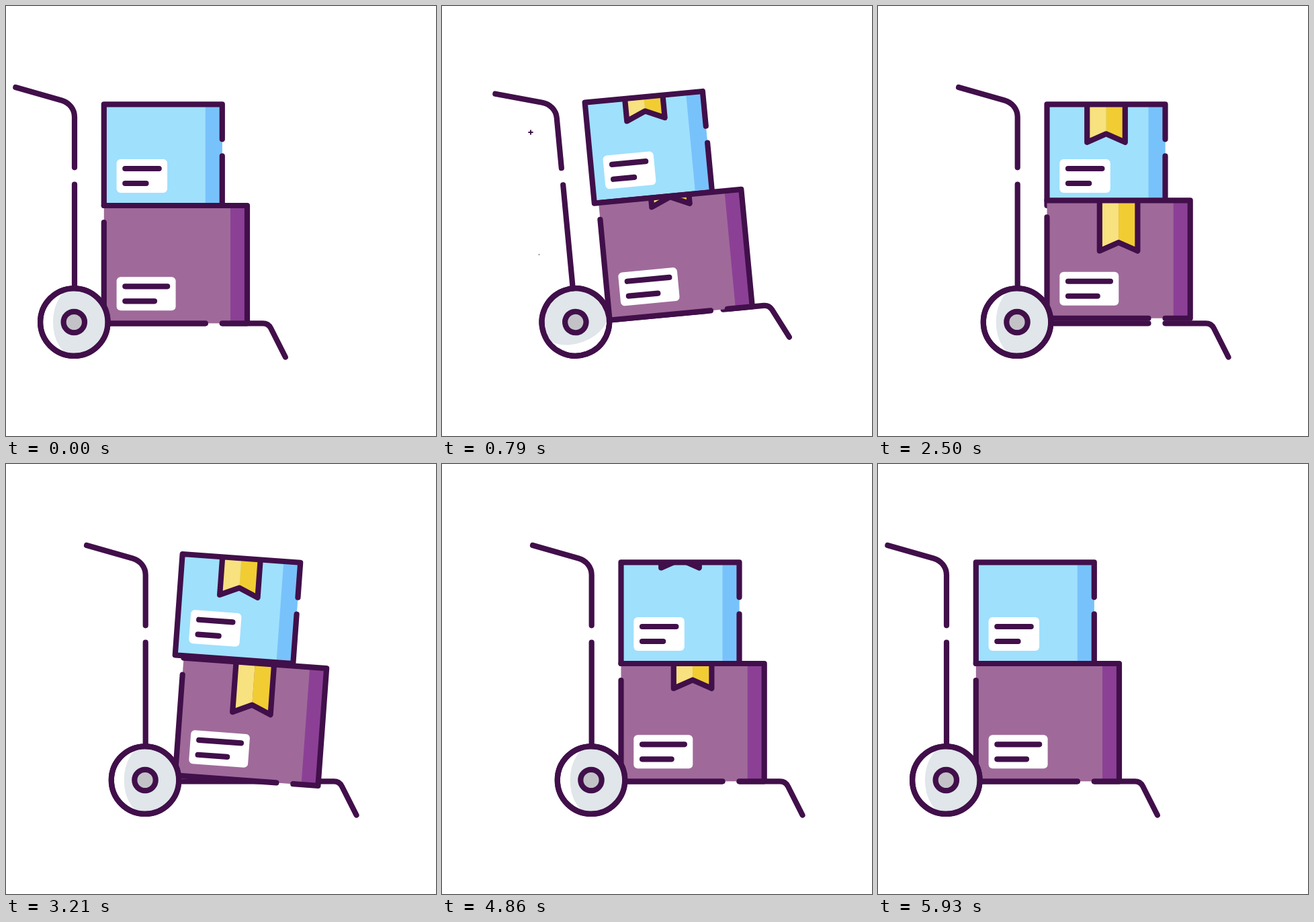
An HTML page with a canvas for the animation above (6 s loop, 640 by 640 pixels).

```html
<!DOCTYPE html>
<html lang="en">
<head>
<meta charset="utf-8">
<title>Hand truck</title>
<style>
html, body { margin: 0; width: 100%; height: 100%; overflow: hidden; background: #fff; }
canvas { display: block; width: 640px; height: 640px; }
</style>
</head>
<body>
<canvas id="stage" width="640" height="640"></canvas>
<script>
const ctx = document.getElementById('stage').getContext('2d');
const LOOP = 6000, INK = '#410f4a', WHITE = '#fff';
const HUB = { x: 207, y: 470.5 };
const STACK_X = 251.5, TRAVEL = 105.7, OVERSHOOT = 35.5;

// The lower box is level 0; the upper one reacts later and further.
const LOWER = { level: 0, y: 297, w: 213.2, h: 175.3, label: 88, ribbon: 75,
  fill: '#9f6a9a', shade: '#8b4096' };
const UPPER = { level: 1, y: 146.3, w: 176, h: 150.7, label: 75.5, ribbon: 56.5,
  fill: '#9fe0fd', shade: '#78c2fb' };
const STARS = [[132, 188], [144.5, 370], [521, 246], [169.5, 307.5], [552.5, 177]];

const sine = p => (1 - Math.cos(Math.PI * p)) / 2;

// Ease curve with control points (.36, 0) and (.33, 1)
function soft(p) {
  let lo = 0, hi = 1;
  for (let i = 0; i < 22; i++) {
    const u = (lo + hi) / 2, v = 1 - u;
    if (1.08 * v * v * u + 0.99 * v * u * u + u * u * u < p) lo = u; else hi = u;
  }
  return lo * lo * (3 - 2 * lo);
}

// Goes from 0 to 1 between two times
function rise(t, from, to, curve = soft) {
  return curve(Math.min(1, Math.max(0, (t - from) / (to - from))));
}

// Goes up to 1, stays, and comes back to 0
function hold(t, up, down, span) {
  return rise(t, up, up + span) - rise(t, down, down + span);
}

// Leans back, swings through to the other side, then settles
function swing(t, start, back, over, end, a, b) {
  return a * rise(t, start, back) + (b - a) * rise(t, back, over) - b * rise(t, over, end);
}

const cartX = t => TRAVEL * (rise(t, 0, 1110) - 1) + OVERSHOOT * rise(t, 4000, 4582, sine) -
  (TRAVEL + OVERSHOOT) * rise(t, 4582, 5930);
const cartTilt = t => swing(t, 0, 580, 1215, 1715, -10.2, 2.1);
const wheelSpin = t => 360 * (rise(t, 0, 1240, sine) - rise(t, 4860, 5640, sine));
const boxSlide = (t, n) => (26.5 + 21 * n) * hold(t, 630 + 150 * n, 1600, 620);
const boxLift = (t, n) => -(14 + 8 * n) * hold(t, 2380 + 120 * n, 3000 + 60 * n, 300);
const boxTurn = t => swing(t, 2520, 3000, 3300, 3640, -5, 5);
const ribbonShown = (t, n) => hold(t, 690 - 78 * n, 4711 - 78 * n, 400);

function stroke(path) {
  ctx.stroke(new Path2D(path));
}

function fill(path, color) {
  ctx.fillStyle = color;
  ctx.fill(new Path2D(path));
}

function rect(x, y, w, h, color) {
  ctx.fillStyle = color;
  ctx.fillRect(x, y, w, h);
}

function disc(r, color) {
  ctx.beginPath();
  ctx.arc(HUB.x, HUB.y, r, 0, 2 * Math.PI);
  ctx.fillStyle = color;
  ctx.fill();
  ctx.stroke();
}

function turnAbout(x, y, deg) {
  ctx.translate(x, y);
  ctx.rotate(deg * Math.PI / 180);
  ctx.translate(-x, -y);
}

function drawCart() {
  stroke('M120 121L188.5 140.5C199.5 143.5 207.7 153.5 207.7 165V240.3M207.7 265.5V425');
  stroke('M250 472.3H402.5M427.5 472.3H488C493 472.3 497.5 475 499.8 479.5L521.5 522.5');
}

function drawRibbon({ y, w, h, ribbon }, shown) {
  if (shown <= 0) return;
  const mid = STACK_X + w / 2, left = mid - 28.3, right = mid + 28.3;
  const tip = y - 4 + (ribbon + 4) * shown, notch = tip - 12.5, start = y - 30;
  ctx.save();
  ctx.beginPath();
  ctx.rect(STACK_X, y - 3, w, h);
  ctx.clip();
  fill(`M${left} ${start}V${tip}L${mid} ${notch}V${start}Z`, '#f8e17f');
  fill(`M${right} ${start}V${tip}L${mid} ${notch}V${start}Z`, '#f1cd33');
  stroke(`M${left} ${start}V${tip}L${mid} ${notch}L${right} ${tip}V${start}`);
  ctx.restore();
}

function drawLabel(bottom, width) {
  const top = bottom - 69, left = STACK_X + 18.8, end = left + width - 12.4;
  ctx.beginPath();
  ctx.roundRect(left, top, width, 50, 6);
  ctx.fillStyle = WHITE;
  ctx.fill();
  stroke(`M283 ${top + 14}H${end}M283 ${top + 36}H${end - 19.2}`);
}

function drawBox(box, t) {
  const { level, y, w, h } = box, right = STACK_X + w, bottom = y + h;
  ctx.save();
  ctx.translate(boxSlide(t, level), boxLift(t, level));
  turnAbout(STACK_X + w / 2, bottom, boxTurn(t));
  rect(STACK_X, y, w, h, box.fill);
  rect(right - 25, y, 25, h, box.shade);
  drawRibbon(box, ribbonShown(t, level));
  stroke(level
    ? `M${right} ${y + 77}V${bottom}H${STACK_X}V${y}H${right}v52`
    : `M${STACK_X} ${y + 25}V${bottom}h151m25 0H${right}V${y}H${STACK_X}`);
  drawLabel(bottom, box.label);
  ctx.restore();
}

function drawWheel(spin) {
  ctx.save();
  turnAbout(HUB.x, HUB.y, spin);
  disc(50.2, WHITE);
  ctx.beginPath();
  ctx.arc(HUB.x, HUB.y, 46.3, -Math.PI / 2, Math.PI / 2);
  ctx.ellipse(HUB.x, HUB.y, 31.3, 50, 0, Math.PI / 2, Math.PI * 1.5);
  ctx.fillStyle = '#e0e6ea';
  ctx.fill();
  disc(50.2, 'transparent');
  disc(15.7, '#c3c3c7');
  ctx.restore();
}

function drawStar([x, y], i, t) {
  const p = (t - 720 - 54 * i ** 1.6) / 950;
  if (p <= 0 || p >= 1) return;
  const size = Math.sin(Math.PI * p);
  ctx.save();
  ctx.translate(x, y);
  ctx.scale(size, size);
  stroke('M-12.5 0H12.5M0 -12.5V12.5');
  ctx.restore();
}

function draw(t) {
  rect(0, 0, 640, 640, WHITE);
  ctx.strokeStyle = INK;
  ctx.lineWidth = 8.2;
  ctx.lineCap = ctx.lineJoin = 'round';
  STARS.forEach((star, i) => drawStar(star, i, t));
  ctx.save();
  ctx.translate(cartX(t), 0);
  turnAbout(HUB.x, HUB.y, cartTilt(t));
  drawCart();
  drawBox(UPPER, t);
  drawBox(LOWER, t);
  drawWheel(wheelSpin(t));
  ctx.restore();
}

const begin = performance.now();
function tick() {
  draw((performance.now() - begin) % LOOP);
  requestAnimationFrame(tick);
}
tick();
</script>
</body>
</html>
```
